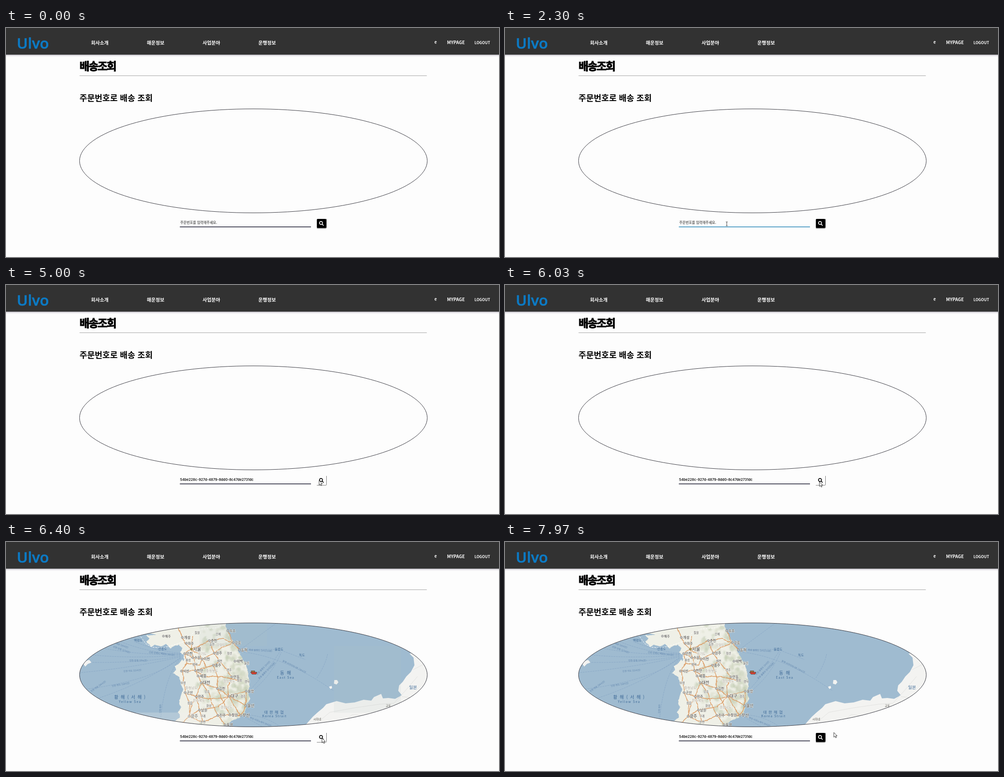
Animation of 1096x511 px, one loop 8 s. Source, as an HTML page:

```html
<!DOCTYPE html>
<html lang="ko">
<head>
<meta charset="utf-8">
<style>
html, body { margin: 0; width: 100%; height: 100%; overflow: hidden; background: #fdfdfd; }
svg { display: block; width: 1096px; height: 511px; font-family: "Noto Sans CJK KR", "Noto Sans CJK", "Noto Sans", sans-serif; }
.mid { text-anchor: middle; }
.logo { font-family: "Open Sans", "Noto Sans", sans-serif; }
.code { font-family: Inter, sans-serif; }
#roads path { fill: none; stroke: #dc9a62; stroke-width: 1.5; stroke-linejoin: round; }
#ferries path { fill: none; stroke: #7c9cc0; stroke-width: .6; stroke-dasharray: 4 1.5; }
#places text { paint-order: stroke; stroke: #f6f5ef; stroke-width: 1.2; }
</style>
</head>
<body>
<svg viewBox="0 0 1096 511">
  <defs>
    <linearGradient id="shade" x2="0" y2="1">
      <stop stop-color="#a49fac" stop-opacity=".7"/>
      <stop offset="1" stop-color="#e4e1ea" stop-opacity="0"/>
    </linearGradient>
    <clipPath id="lens"><ellipse cx="550" cy="296.5" rx="386.5" ry="116"/></clipPath>
    <clipPath id="shore"><use href="#korea"/></clipPath>
    <filter id="rough" x="-5%" y="-5%" width="110%" height="110%" color-interpolation-filters="sRGB">
      <feTurbulence type="fractalNoise" baseFrequency=".09" numOctaves="3" seed="4"/>
      <feDisplacementMap in="SourceGraphic" scale="4" xChannelSelector="R" yChannelSelector="G"/>
    </filter>
    <filter id="soft"><feGaussianBlur stdDeviation="1.6"/></filter>
  </defs>

  <rect y="59" width="1096" height="6" fill="url(#shade)"/>
  <rect width="1096" height="59.5" fill="#323232"/>
  <g id="page"></g>
  <path d="M163.500 106.500H935.500" stroke="#a2a2a2"/>

  <g id="map" clip-path="url(#lens)">
    <rect x="160" y="178" width="780" height="240" fill="#9fbbd0"/>
    <g id="ferries"></g>
    <g filter="url(#rough)">
      <path id="korea" fill="#eff0e7" d="M350 170L330 190 302 200 334 207 311 209 318 214 312 222 322 234 333 230 345 233 355 228 365 237 376 231 384 229 391 236 388 246 394 252 396 266 391 262 386 271 375 277 378 285 371 292 385 300 389 315 393 330 388 345 385 360 390 370 383 380 387 390 373 402 383 412 380 425H480L489 411 497 402 510 396 522 390 530 381 533 372 536 360 543 350 538 335 541 320 540 305 538 290 534 275 526 260 517 245 512 232 505 220 495 205 488 188 490 170Z"/>
      <g id="hills" clip-path="url(#shore)"></g>
    </g>
    <path fill="#f3f3f1" d="M960 238L897 249 906 258 908 275 900 290 890 300 882 312 874 320 872 332 880 342 865 350 850 348 838 349 834 339 818 346 812 354 795 352 775 358 755 360 735 355 712 362 705 370 693 380 682 390 668 406 655 425H960Z"/>
    <path fill="#f3f3f1" d="M730 308l6 0 3 5-4 5-6-2zM718 323l6-2 1 5-4 2zM176 266l9-3 5 6-8 3-6 6-4-6z"/>
    <path fill="none" stroke="#e2e2e0" d="M690 405L720 380 775 370 830 362 862 360 885 335 915 300M735 415L770 385 815 390 860 372M880 345L925 350M905 285L930 272"/>
    <g id="roads" filter="url(#rough)"></g>
    <path fill="none" stroke="#fff" stroke-dasharray="4 2" d="M296 207L311 227 325 235 350 236 378 228 397 222 415 204 436 194 465 192 489 183"/>
    <g id="places"></g>
    <g id="seas"></g>
    <g stroke="#333" stroke-width=".7">
      <path fill="#dd4030" d="M543.500 290.500H558L556 295H547Z"/>
      <path fill="#b8793f" d="M545 287.500H553V290.500H546Z"/>
    </g>
    <g id="tiles">
      <rect x="160" y="380.500" width="270" height="40" fill="#f4f3ef" opacity=".82"/>
      <path fill="#b3c6c8" opacity=".4" d="M430 178H580V232H430ZM729 232H878V381H729Z"/>
    </g>
  </g>
  <ellipse cx="550" cy="296.500" rx="386.500" ry="116" fill="none" stroke="#34343c"/>

  <g id="hint"></g>
  <g id="order"></g>
  <path id="line" d="M386.500 443.700H678" stroke-width="1.600"/>
  <rect id="button" x="691" y="426" width="21" height="20.500" rx="2"/>
  <path d="M691 447H710.500Q712.500 447 712.500 445V426" fill="none" stroke="#777"/>
  <path id="lens-icon" d="M703.700 435a3.400 3.400 0 1 0-6.800 0a3.400 3.400 0 1 0 6.800 0M702.700 437.500L706 440.800" fill="none" stroke-width="1.700"/>
  <g id="cursor">
    <path id="arrow" d="M0 0V10.500L2.500 8.300 4.200 12 5.900 11.200 4.300 7.600H7.400Z" fill="#fff" stroke="#222" stroke-width=".9"/>
    <path id="beam" d="M-2 -4.500Q0 -4.500 0 -3.500Q0 -4.500 2 -4.500M0 -3.500V3.500M-2 4.500Q0 4.500 0 3.500Q0 4.500 2 4.500" fill="none" stroke="#222" stroke-width=".9"/>
  </g>
</svg>
<script>
const $ = id => document.getElementById(id);
const show = (id, on) => $(id).setAttribute('visibility', on ? 'inherit' : 'hidden');

// y is the vertical middle of the glyphs
function label(id, str, x, y, size, fill, attrs = '') {
  $(id).insertAdjacentHTML('beforeend',
    `<text x="${x}" y="${y + size * .37}" font-size="${size}" fill="${fill}" ${attrs}>${str}</text>`);
}
function rows(text, draw) {
  text.trim().split(/\s*;\s*/).forEach(row => {
    const [name, ...nums] = row.split(' ');
    draw(name.replace(/_/g, ' '), ...nums.map(Number));
  });
}
const paths = (id, list) => $(id).innerHTML = list.map(d => `<path d="M${d}"/>`).join('');

const bold = 'font-weight="700"';
label('page', 'Ulvo', 24, 34, 33, '#0c7ac4', 'class="logo" font-weight="600" stroke="#0c7ac4" stroke-width=".7"');
['회사소개', '해운정보', '사업분야', '운행정보'].forEach((s, i) => label('page', s, 189 + 124 * i, 33, 10.6, '#fff', bold));
label('page', 'e', 952.5, 32, 9, '#fff', bold);
label('page', 'MYPAGE', 980.5, 32, 9.9, '#fff', bold);
label('page', 'LOGOUT', 1041.5, 32.5, 8.3, '#fff', bold);
label('page', '배송조회', 163.5, 85, 24, '#000', 'font-weight="900" letter-spacing="-1.9" stroke="#000" stroke-width="1"');
label('page', '주문번호로 배송 조회', 163.5, 156, 18.4, '#000', bold);
label('hint', '주문번호를 입력해주세요.', 387.5, 434, 7.65, '#666', bold);
label('order', '54be228c-927d-4879-8dd0-8c47de2731dc', 387, 434, 7.65, '#111', 'class="code" font-weight="600"');

let seed = 7;
const rnd = () => (seed = seed * 16807 % 2147483647) / 2147483647;
let hills = '';
for (let i = 0; i < 230; i++) {
  const x = 420 + 120 * Math.sqrt(rnd()), y = 182 + 225 * rnd();
  hills += `<ellipse cx="${x}" cy="${y}" rx="${2 + 5 * rnd()}" ry="${2 + 7 * rnd()}" fill="${rnd() < .5 ? '#bcc8ac' : '#d3d8c4'}" opacity=".5"/>`;
}
$('hills').innerHTML = `<g filter="url(#soft)">${hills}</g>`;

paths('roads', [
  '383 190L392 213 400 228 412 239 397 249',
  '412 239L418 258 421 287 434 314 470 327 496 344 533 365',
  '434 314L423 345 412 368 407 389 390 405',
  '412 239L430 232 452 220 482 216 505 225 519 241',
  '397 249L415 258 436 261 463 248 480 236 505 225 493 198',
  '397 249L402 270 392 288 396 315 398 336 409 360 407 389',
  '452 220L463 248 475 266 489 283 502 301 493 322 496 344 534 333',
  '496 344L507 366 522 387 498 386 471 387 438 402 407 389',
  '436 261L445 280 461 275 470 300 470 327 484 360 498 386',
  '434 314L452 338 458 362 471 387 487 408',
  '421 287L445 300 480 300 520 310',
  '423 345L450 350 484 348 496 344',
  '522 387L533 365 534 333',
  '392 288L421 287 461 275 475 266',
  '398 336L423 345 430 375 438 402',
  '407 389L430 375 471 368 496 344',
  '402 270L430 275 436 261',
  '415 210L412 239 430 252 436 261']);

paths('ferries', [
  '388 250Q320 250 235 215', '388 250Q300 255 190 232', '388 252Q280 262 170 250',
  '388 254Q300 272 160 268', '388 256Q290 280 160 292', '388 258Q330 310 165 330',
  '388 260Q350 300 342 415', '388 248Q340 245 285 222', '388 258Q300 320 185 355',
  '522 243Q565 238 607 240', '541 332Q580 290 610 243', '541 338Q590 300 612 246',
  '522 245Q620 255 728 332', '607 240L665 262', '528 235L605 178',
  '715 250Q710 275 690 305', '527 388L575 415', '530 386Q570 385 610 412']);

const cities = `해주 350 210 7; 개성 392 213 8; 파주 401 226 7; 서울 412 239 10; 인천 397 249 8;
 수원 415 258 7.5; 이천 436 261 7.5; 춘천 452 220 7.5; 강릉 505 225 7.5; 속초 493 198 7.5;
 동해 519 241 7.5; 원주 463 248 7.5; 충주 461 275 7.5; 태백 509 266 7.5; 안동 502 301 7.5;
 서산 390 288 7.5; 천안 421 287 7.5; 세종 427 299 8.5; 대전 434 314 9; 군산 398 336 7.5;
 전주 423 345 7.5; 김천 470 327 7.5; 대구 496 344 9; 포항 534 333 7.5; 울산 533 365 8.5;
 부산 522 387 9; 창원 498 386 7.5; 진주 471 387 7.5; 남원 430 375 7.5; 광주 407 389 9; 통영 487 408 7.5`;
const towns = `철원 425 203; 인제 472 206; 홍천 458 229; 정선 497 249; 화성 405 264; 평택 420 274;
 제천 475 266; 영주 496 286; 울진 535 271; 영덕 536 312; 청송 519 309; 보령 394 315; 경주 527 345;
 정읍 409 360; 함양 451 366; 무주 447 335; 구례 438 389; 순천 438 402; 교토 850 366; 시마네 692 396`;
const regions = `강원도 478 229; 경기도 436 249; 충청북도 458 287; 충청남도 412 325;
 경상북도 496 310; 전라북도 429 353; 경상남도 490 368`;
const seas = `황_해_(_서_해_) 276 346 10 1.2; Yellow_Sea 276 356 7 1.5; 동_해 622 292 10 1.5; East_Sea 622 302 7 1.4;
 대_한_해_협 596 380 8.5 .8; Korea_Strait 597 388 7 1.3; 백령도 294 219 7 0; 연평도 348 238 7 0;
 울릉도 607 239 7 0; 독도 658 252 7 0; 일본 905 324 9.5 0`;
const routes = `인천-위해_(18시간) 294 264 0; 인천-석도_(15시간) 281 287 -4; 인천-청도_(18시간) 255 318 -10;
 인천-연운_(24시간) 205 322 -35; 인천-단동_(17시간) 257 240 20; 인천-대련_(16시간) 253 229 20;
 인천-연평도-백령도_(4시간) 346 249 6; 인천-제주 343 372 -86; 묵호-울릉도_(3시간10분) 566 242 3;
 포항-울릉도_(3시간) 572 281 -45; 후포-울릉도_(2시간50분) 580 287 -45;
 동해-사카이미나토_(14시간) 641 278 27; 부산-시모노세키_(8시간) 566 401 22`;

rows(regions, (s, x, y) => label('places', s, x, y, 7.3, '#aaa69c', 'class="mid"'));
rows(towns, (s, x, y) => label('places', s, x, y, 6.3, '#555', 'class="mid"'));
rows(cities, (s, x, y, size) => {
  $('places').insertAdjacentHTML('beforeend', `<circle cx="${x}" cy="${y}" r="2.3" fill="${s === '서울' ? '#e8c63d' : '#fff'}" stroke="#555" stroke-width=".8"/><circle cx="${x}" cy="${y}" r=".8" fill="#444"/>`);
  label('places', s, x + 3.5, y, size, '#333', 'font-weight="500"');
});
rows(seas, (s, x, y, size, gap) => label('seas', s, x, y, size, '#3c6896', `class="mid" letter-spacing="${gap}"`));
rows(routes, (s, x, y, turn) => label('seas', s, x, y, 5, '#5c80aa', `class="mid" transform="rotate(${turn} ${x} ${y})"`));

// pointer stops: time, x, y
const stops = [[1700, 620, 447], [2300, 493, 437], [3300, 493, 437], [3800, 696, 436], [5870, 696, 436],
  [6030, 699, 439], [6230, 699, 439], [7000, 726, 427], [7070, 726, 427], [7870, 731, 425]];
function pointer(t) {
  const next = stops.findIndex(s => s[0] > t);
  if (next < 1) return (next ? stops[stops.length - 1] : stops[0]).slice(1);
  const a = stops[next - 1], b = stops[next], u = (t - a[0]) / (b[0] - a[0]), k = u * u * (3 - 2 * u);
  return [a[1] + (b[1] - a[1]) * k, a[2] + (b[2] - a[2]) * k];
}

function draw(now) {
  const t = now % 8000, [x, y] = pointer(t), seen = t >= 1700, filled = t >= 3230;
  const inField = seen && x > 386 && x < 678 && y > 424 && y < 444;
  const onButton = seen && x > 691 && x < 712.5 && y > 426 && y < 447;
  show('hint', !filled);
  show('order', filled);
  show('map', t >= 6230);
  $('tiles').setAttribute('opacity', Math.max(0, Math.min(1, (6460 - t) / 200)));
  $('line').setAttribute('stroke', inField ? '#2283b5' : '#14142a');
  $('button').setAttribute('fill', onButton ? '#fdfdfd' : '#000');
  $('lens-icon').setAttribute('stroke', onButton ? '#000' : '#fff');
  $('cursor').setAttribute('transform', `translate(${x} ${y})`);
  show('cursor', seen);
  show('arrow', !inField);
  show('beam', inField);
  requestAnimationFrame(draw);
}
requestAnimationFrame(draw);
</script>
</body>
</html>
```
